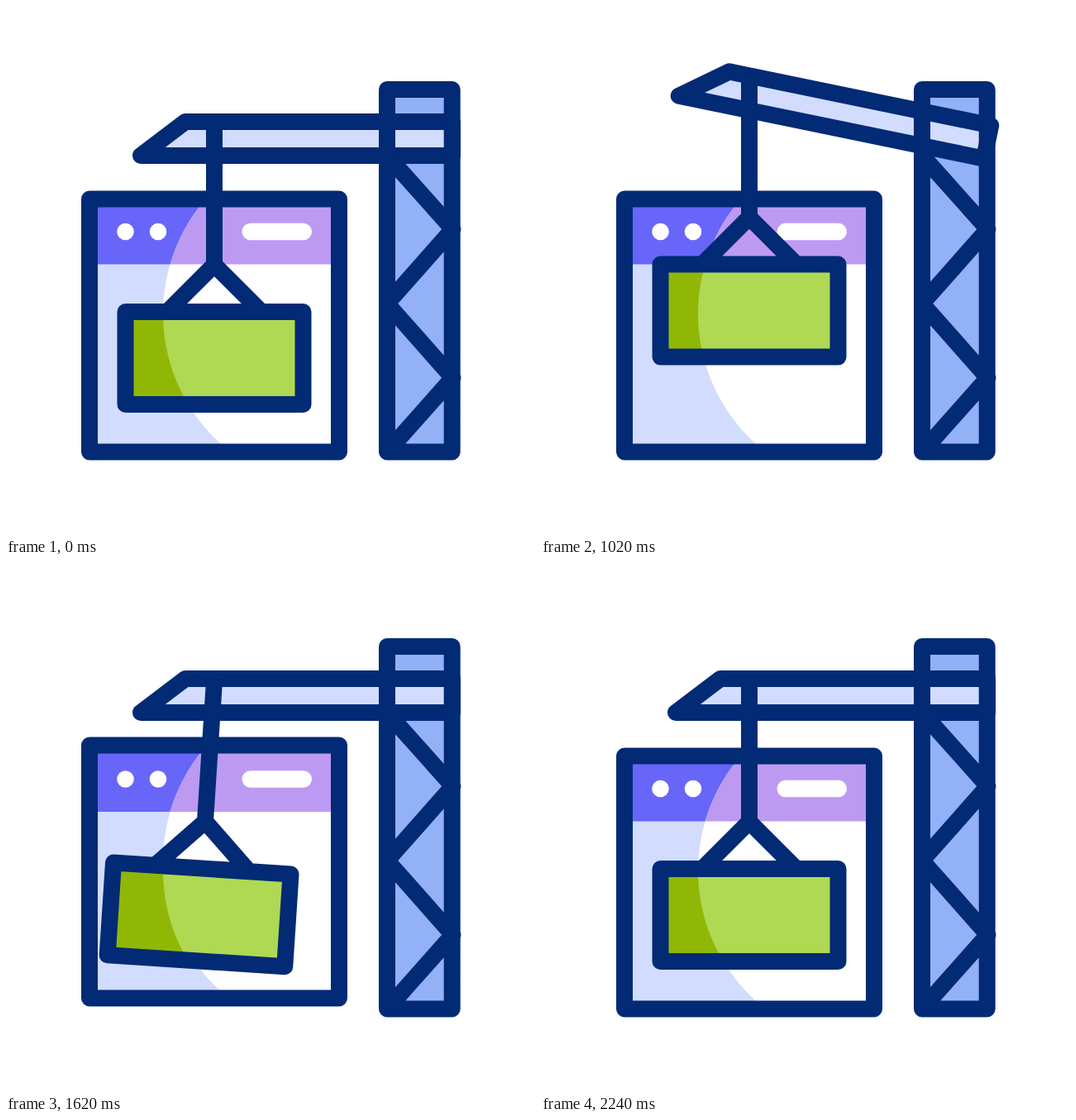
An HTML page that plays this animation: 640 px wide and 640 px high, repeating every 2.4 s.

```html
<!DOCTYPE html>
<html lang="en">
<head>
<meta charset="utf-8">
<title>Crane</title>
<style>
  html, body { margin: 0; width: 100%; height: 100%; overflow: hidden; background: #fff; }
  svg { display: block; width: 100vw; height: 100vh; }
  .line { fill: none; stroke: #022a75; stroke-width: 20; stroke-linejoin: round; }
</style>
</head>
<body>
<svg viewBox="0 0 640 640">
  <defs>
    <clipPath id="light"><circle cx="402" cy="372.4" r="212"/></clipPath>
  </defs>

  <rect x="461" y="101" width="79" height="438.5" fill="#93b1f6"/>
  <path id="arm" class="line" style="fill:#d2dcff" d="M163 181L217 140H540V181Z"/>
  <path class="line" d="M461 101H539.7V539.5H461ZM461 181L540.5 270L461 360L540.5 450L461 539.5"/>

  <g id="page">
    <rect x="101" y="233.5" width="302" height="306" fill="#d2dcfe"/>
    <rect x="101" y="233.5" width="302" height="79" fill="#6865f9"/>
    <g clip-path="url(#light)">
      <rect x="101" y="233.5" width="302" height="306" fill="#fff"/>
      <rect x="101" y="233.5" width="302" height="79" fill="#bc9af2"/>
    </g>
    <g fill="#fff">
      <circle cx="144.5" cy="273" r="10.3"/>
      <circle cx="184" cy="273" r="10.3"/>
      <rect x="285.5" y="262.7" width="84.5" height="20.6" rx="10.3"/>
    </g>
  </g>
  <rect id="frame" class="line" x="101" y="233.5" width="302" height="306"/>

  <rect class="load" x="144.5" y="370" width="215" height="112" fill="#91b706"/>
  <g clip-path="url(#light)">
    <rect class="load" x="144.5" y="370" width="215" height="112" fill="#afd853"/>
  </g>
  <path class="load line" d="M252 140V313M195 370L252 313L309 370M144.5 370H359.5V482H144.5Z"/>
</svg>
<script>
  const LOOP = 2400;
  const $ = id => document.getElementById(id);
  const load = document.querySelectorAll('.load');
  const set = (el, value) => el.setAttribute('transform', value);

  // Keys are [time, value] pairs, eased in and out between neighbours.
  function track(keys, t) {
    const i = keys.findIndex(k => k[0] > t);
    if (i < 0) return keys[keys.length - 1][1];
    if (i === 0) return keys[0][1];
    const [t0, a] = keys[i - 1], [t1, b] = keys[i];
    const u = (t - t0) / (t1 - t0);
    return a + (b - a) * u * u * (3 - 2 * u);
  }

  const LIFT = [[200, 0], [600, 1], [1000, 1], [1200, 0]];
  const SWING = [[1200, 0], [1500, 13], [1800, -13], [2000, 13], [2200, 0]];
  const HOP = [[1200, 0], [1500, 1], [1800, 0]];

  function draw(t) {
    const lift = track(LIFT, t), swing = track(SWING, t), hop = track(HOP, t);
    set($('arm'), `rotate(${12 * lift} 520 163)`);
    set($('frame'), `translate(0 ${-20.2 * hop})`);
    set($('page'), `translate(0 ${-17.9 * hop})`);
    for (const el of load) {
      set(el, `translate(0 ${-59.2 * lift}) rotate(${swing} 252 143)`);
    }
  }

  const start = performance.now();
  function tick() {
    draw((performance.now() - start) % LOOP);
    requestAnimationFrame(tick);
  }
  tick();
</script>
</body>
</html>
```
